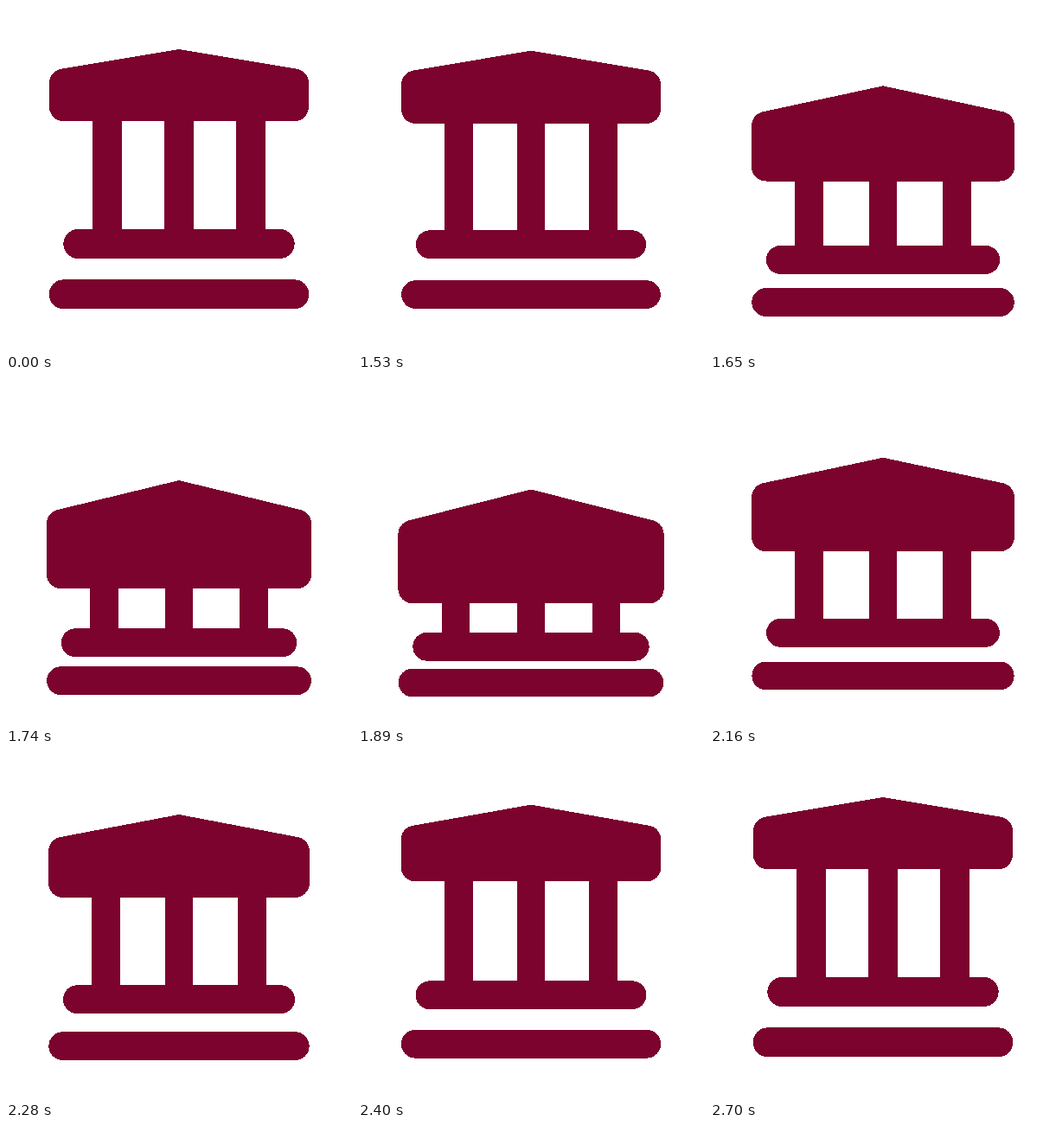
These frames come from a looping animation (400 px wide and 400 px high, 2.73 s). An HTML page:

```html
<!DOCTYPE html>
<html lang="en">
<head>
<meta charset="utf-8">
<title>Bouncing bank</title>
<style>
  html, body { margin: 0; width: 100%; height: 100%; overflow: hidden; background: #fff; }
  svg { display: block; width: 100%; height: 100%; shape-rendering: crispEdges; }
  #bars { fill: none; stroke: #7b032e; stroke-linecap: round; }
  #roof { fill: #7b032e; }
</style>
</head>
<body>
<svg viewBox="0 0 400 400">
  <path id="bars"/>
  <path id="roof"/>
</svg>
<script>
const LOOP = 2730, STEP = 30, START = 1500, PEAK = 1890, END = 2700;
const RADIUS = 50 / 3;
const bars = document.getElementById('bars');
const roof = document.getElementById('roof');

// Cubic bezier easing with control points (x1, 0) and (x2, 1)
function ease(x, x1, x2) {
  let low = 0, high = 1;
  for (let i = 0; i < 30; i++) {
    const u = (low + high) / 2, v = 1 - u;
    if (3 * v * v * u * x1 + 3 * v * u * u * x2 + u ** 3 < x) low = u;
    else high = u;
  }
  return low * low * (3 - 2 * low);
}

// 0 = standing, 1 = fully squashed
function squashAt(time) {
  if (time <= START || time >= END) return 0;
  return time < PEAK
    ? ease((time - START) / (PEAK - START), 0.32, 0.3)
    : 1 - ease((time - PEAK) / (END - PEAK), 0.32, 0.26);
}

function roofPath(left, apex, corner, bottom) {
  const right = 400 - left, r = RADIUS;
  const angle = Math.atan2(corner - apex, 200 - left);
  const tangent = r / Math.tan(Math.PI / 4 + angle / 2);
  const dx = tangent * Math.cos(angle);
  const shoulder = corner - tangent * Math.sin(angle);
  const arc = (x, y) => `A${r} ${r} 0 0 1 ${x} ${y}`;
  return `M200 ${apex}L${right - dx} ${shoulder}` + arc(right, corner + tangent) +
    `V${bottom - r}` + arc(right - r, bottom) +
    `H${left + r}` + arc(left, bottom - r) +
    `V${corner + tangent}` + arc(left + dx, shoulder) + 'Z';
}

function draw(squash) {
  const spread = 3.6 * squash;
  const bottom = 133.3 + 125 * squash;
  const plinth = 275 + 33.3 * squash;
  const ground = 333.3 + 16.7 * squash;
  const bar = (inset, y) => `M${inset - spread} ${y}H${400 - inset + spread}`;
  const column = x => `M${x} ${bottom - 20}V${plinth}`;

  roof.setAttribute('d', roofPath(50 - spread, 50 + 76.5 * squash, 75 + 90.5 * squash, bottom));
  bars.setAttribute('d', bar(83.33, plinth) + bar(66.67, ground) +
    column(116.67 - spread) + column(200) + column(283.33 + spread));
  bars.setAttribute('stroke-width', squash ? 32.8 : 34);
}

const origin = performance.now();
function tick() {
  const time = (performance.now() - origin) % LOOP;
  draw(squashAt(Math.floor(time / STEP) * STEP));
  requestAnimationFrame(tick);
}
tick();
</script>
</body>
</html>
```
